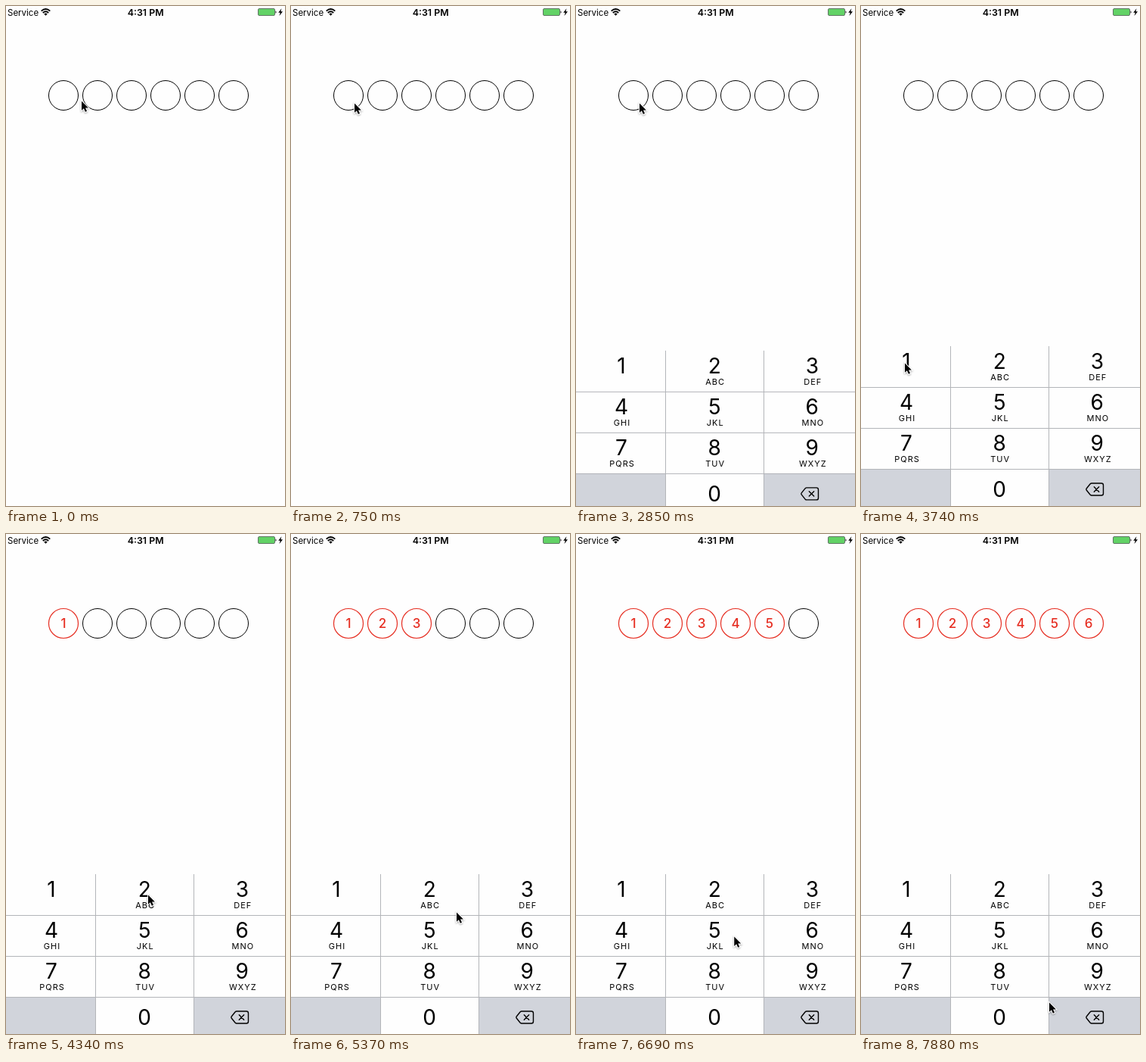
These frames come from a looping animation (369x660 px, 8 s). An HTML page:

```html
<!DOCTYPE html>
<html lang="en">
<head>
<meta charset="utf-8">
<title>Passcode entry</title>
<style>
  html, body { margin: 0; width: 100%; height: 100%; overflow: hidden; background: #fefefe; }
  svg { display: block; width: 369px; height: 660px; font-family: Inter, Roboto, sans-serif; }
  text { text-anchor: middle; }
  .digit { font-size: 28px; }
  .letters { font-size: 11px; letter-spacing: 1px; }
  .slot circle { fill: none; stroke: #000; }
  .slot text { font-size: 17px; font-weight: 500; fill: #e62e22; visibility: hidden; }
  .slot.filled circle { stroke: #e62e22; stroke-width: 1.2; }
  .slot.filled text { visibility: visible; }
  .key { fill: #fefefe; }
  .key.grey { fill: #d1d4db; }
</style>
</head>
<body>
<svg viewBox="0 0 369 660">
  <defs>
    <filter id="shadow" x="-50%" y="-50%" width="200%" height="200%">
      <feDropShadow dx="0" dy="1" stdDeviation=".9" flood-opacity=".4"/>
    </filter>
  </defs>

  <g id="status">
    <text x="2" y="13" font-size="11.5" style="text-anchor:start">Service</text>
    <path d="M46.7 6.6Q52.5 1.4 58.3 6.6M48.8 9Q52.5 5.7 56.2 9" fill="none" stroke="#000" stroke-width="1.9"/>
    <path d="M50.3 10.4Q52.5 8.6 54.7 10.4L52.5 12.8Z"/>
    <text x="184.7" y="13" font-size="12.4" font-weight="600">4:31 PM</text>
    <rect x="333.5" y="3.5" width="22" height="9" rx="1.5" fill="#62d266" stroke="#627566"/>
    <path d="M356.5 6.2Q358.6 8 356.5 9.8Z"/>
    <path d="M364.4 3.2L360.2 8.7H362.7L361.5 13L366 7.3H363.4Z"/>
  </g>

  <g id="slots"></g>
  <g id="keyboard"></g>
  <path id="cursor" d="M1 1.5V13.8L3.9 11.2L5.9 15.7L8 14.8L6 10.4H9.9Z"
        stroke="#fff" stroke-width="1.8" paint-order="stroke" filter="url(#shadow)"/>
</svg>

<script>
const LOOP = 8000;
const TICK = 148.6; // the screen refreshes in discrete steps
const KEYBOARD_TICK = 17;
const KEY_TOP = 449, KEY_HEIGHT = 54;
const MAX_MOVE = 6, TAP_LENGTH = 0.6; // in ticks
const byId = id => document.getElementById(id);

const stop = (tick, x, y) => ({ tick, x, y });
const tap = (tick, x, y) => ({ tick, x, y, tap: true });

// Where the pointer goes; each tap presses the next key.
const stops = [
  stop(0, 99, 124), stop(3, 68, 115), stop(5, 83, 127), stop(25, 57, 470),
  tap(28, 57, 470), stop(29, 187, 475), tap(31, 187, 475), tap(34, 304, 477),
  stop(36, 218, 498), tap(40.2, 82, 516), tap(44, 185, 532), tap(49.2, 306, 522),
  stop(53, 248, 617),
];
const taps = stops.filter(s => s.tap);

function buildSlots() {
  byId("slots").innerHTML = taps.map((_, i) => {
    const x = 76 + 45 * i;
    return `<g class="slot"><circle cx="${x}" cy="118" r="19.5"/>
      <text x="${x}" y="124">${i + 1}</text></g>`;
  }).join("");
}

function buildKeyboard() {
  const letters = ["", "ABC", "DEF", "GHI", "JKL", "MNO", "PQRS", "TUV", "WXYZ"];
  const edges = [0, 119, 249, 369];
  const centers = [60, 183.2, 312.3];
  const keys = ["1", "2", "3", "4", "5", "6", "7", "8", "9", "", "0", ""];

  const markup = keys.map((label, i) => {
    const column = i % 3;
    const left = edges[column], width = edges[column + 1] - left;
    const x = centers[column], top = KEY_TOP + KEY_HEIGHT * Math.floor(i / 3);
    const baseline = top + (letters[i] === undefined ? 37 : 30);
    return `<rect class="key ${label ? "" : "grey"}" x="${left}" y="${top}" width="${width}" height="${KEY_HEIGHT}"/>
      <text class="digit" x="${x}" y="${baseline}">${label}</text>
      <text class="letters" x="${x + 1}" y="${top + 45}">${letters[i] ?? ""}</text>`;
  }).join("");

  byId("keyboard").innerHTML = markup + `
    <path d="M118.5 449V660M248.5 449V660M0 503.5H369M0 557.5H369M0 611.5H369" stroke="#b3b5b9"/>
    <g fill="none" stroke="#000" stroke-width="1.4" stroke-linejoin="round" stroke-linecap="round">
      <path d="M305 630H318Q320.5 630 320.5 632.5V643.5Q320.5 646 318 646H305Q304 646 303 645L298.2 639Q297.4 638 298.2 637L303 631Q304 630 305 630Z"/>
      <path d="M308.3 634.8L314.7 641.2M314.7 634.8L308.3 641.2"/>
    </g>`;
}

function pointerAt(tick) {
  const next = stops.findIndex(s => s.tick > tick);
  if (next < 0) return stops.at(-1);
  const from = stops[next - 1], to = stops[next];
  const leave = Math.max(from.tick, to.tick - MAX_MOVE);
  const k = Math.max(0, (tick - leave) / (to.tick - leave));
  return { x: from.x + (to.x - from.x) * k, y: from.y + (to.y - from.y) * k };
}

function draw(time) {
  const tick = Math.floor(time / TICK);
  const slots = document.querySelectorAll(".slot");
  const keys = document.querySelectorAll(".key");

  taps.forEach((t, i) => {
    slots[i].classList.toggle("filled", tick > t.tick);
    keys[i].classList.toggle("grey", tick >= t.tick && tick < t.tick + TAP_LENGTH);
  });

  const sinceOpen = tick - KEYBOARD_TICK;
  const offset = sinceOpen < 0 ? 220 : sinceOpen < 4 ? 147.4 * 0.2 ** sinceOpen : 0;
  byId("keyboard").setAttribute("transform", `translate(0 ${offset})`);

  const { x, y } = pointerAt(tick);
  byId("cursor").setAttribute("transform", `translate(${x} ${y})`);
}

buildSlots();
buildKeyboard();
const start = performance.now();
function loop() {
  draw((performance.now() - start) % LOOP);
  requestAnimationFrame(loop);
}
loop();
</script>
</body>
</html>
```
